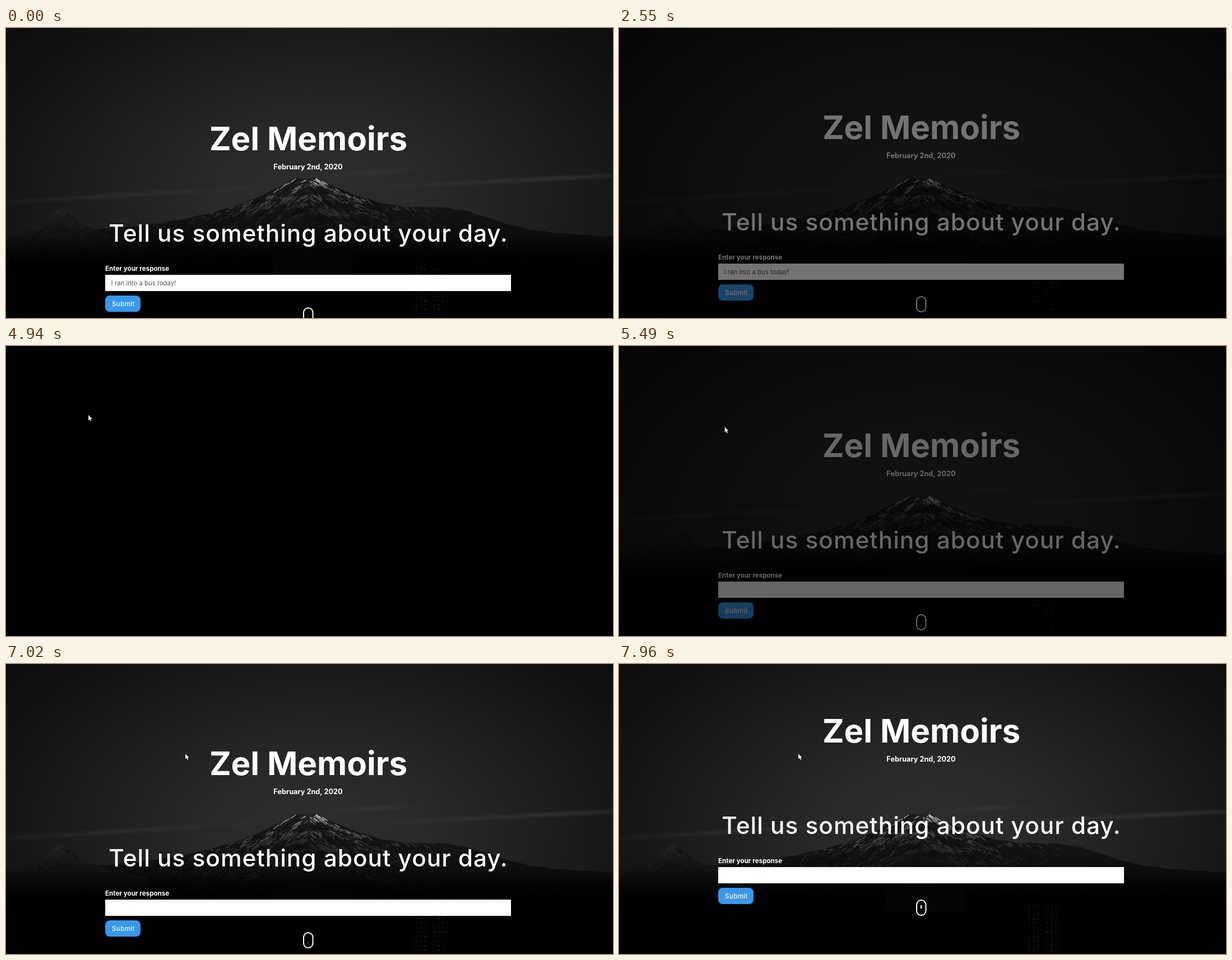
These frames come from a looping animation (1083 px wide and 517 px high, 8 s). An HTML page with a canvas:

```html
<!DOCTYPE html>
<html lang="en">
<head>
<meta charset="utf-8">
<title>Zel Memoirs</title>
<style>
html, body { margin: 0; width: 100%; height: 100%; overflow: hidden; background: #000; }
canvas { display: block; }
</style>
</head>
<body>
<canvas id="stage" width="1083" height="517"></canvas>
<script>
const W = 1083, H = 517, LOOP = 8000;
const ctx = document.getElementById('stage').getContext('2d');

let seed = 7;
const rand = () => (seed = (seed * 16807) % 2147483647) / 2147483647;
const grey = (v, a = 1) => `rgba(${v},${v},${v},${a})`;
const clamp = v => Math.min(1, Math.max(0, v));
const swing = p => 0.5 - Math.cos(clamp(p) * Math.PI) / 2;

// Vertical or radial gradient with evenly spaced greys
function shade(gradient, greys) {
  greys.forEach((v, i) => gradient.addColorStop(i / (greys.length - 1), grey(v)));
  return gradient;
}

// Slope that is flat at the peak and levels out with distance
const cone = (distance, height, width, flat) =>
  height * (1 - Math.exp(-Math.max(0, distance - flat) / width));

function bigRidge(x) {
  const d = x - 535;
  if (d < 0) return 267 + cone(-d, 105, 165, 20);
  return 267 + cone(d, 115, 220, 20) - 22 * Math.exp(-(((d - 270) / 90) ** 2));
}
const smallRidge = x => 321 + cone(Math.abs(x - 97), 62, 60, 4);

// A dark massif with short strokes running down from its peak
function mountain(c, ridge, { peak, from, to, greys, count, spread, depth, glow }) {
  c.save();
  c.beginPath();
  c.moveTo(from, H);
  for (let x = from; x <= to; x += 3) c.lineTo(x, ridge(x) + Math.sin(x / 7) * 0.6);
  c.lineTo(to, H);
  c.fillStyle = shade(c.createLinearGradient(0, ridge(peak), 0, 425), greys);
  c.fill();
  c.clip();
  for (let i = 0; i < count; i++) {
    const x = peak + (rand() + rand() - 1) * spread;
    const d = rand() * depth;
    const near = Math.exp(-Math.abs(x - peak) / (spread * 0.42) - d / (depth * 0.4));
    const facet = Math.sin(x / 11 + d / 4) + Math.sin(x / 27 - d / 7);
    const lit = facet + rand() > 0.3;
    const side = x < peak ? -1 : 1;
    const len = 3 + rand() * 8;
    c.strokeStyle = lit ? grey(Math.round(18 + glow * near), 0.6) : grey(10, 0.5);
    c.lineWidth = 0.6 + rand() * 1.3;
    c.beginPath();
    c.moveTo(x, ridge(x) + d);
    c.lineTo(x + side * len, ridge(x) + d + len * (0.4 + rand() * 0.5));
    c.stroke();
  }
  c.restore();
}

function cloud(c, x, y, length, rise, alpha) {
  c.save();
  c.filter = 'blur(2.5px)';
  c.translate(x, y);
  c.rotate(-rise);
  const g = c.createLinearGradient(0, 0, length, 0);
  [0, alpha, 0].forEach((a, i) => g.addColorStop(i / 2, grey(150, a)));
  c.fillStyle = g;
  c.fillRect(0, -3, length, 6);
  c.restore();
}

function building(c, x, y, cols, rows) {
  for (let i = 0; i < cols; i++) for (let j = 0; j < rows; j++) {
    c.fillStyle = grey(17, 0.3 + rand() * 0.7);
    c.fillRect(x + i * 8, y + j * 8, 4, 4);
  }
}

function paintScene() {
  const scene = document.createElement('canvas');
  scene.width = W;
  scene.height = H;
  const c = scene.getContext('2d');

  c.save();
  c.translate(560, 300);
  c.scale(1, 0.62);
  c.fillStyle = shade(c.createRadialGradient(0, 0, 0, 0, 0, 760), [46, 41, 31, 21, 11]);
  c.fillRect(-560, -500, W, 1000);
  c.restore();

  cloud(c, -120, 318, 620, 0.06, 0.12);
  cloud(c, 640, 285, 690, 0.05, 0.18);
  cloud(c, 560, 262, 200, 0.05, 0.1);

  mountain(c, bigRidge, { peak: 540, from: 0, to: W, greys: [34, 22, 17, 9, 2],
    count: 1300, spread: 270, depth: 78, glow: 235 });
  mountain(c, smallRidge, { peak: 97, from: -3, to: 252, greys: [32, 21, 13, 2],
    count: 200, spread: 110, depth: 45, glow: 40 });

  const ground = c.createLinearGradient(0, 370, 0, 435);
  [0, 0.55, 0.95].forEach((a, i) => ground.addColorStop(i / 2, grey(0, a)));
  c.fillStyle = ground;
  c.fillRect(0, 370, W, H - 370);

  c.fillStyle = grey(5);
  c.fillRect(476, 402, 142, 40);
  c.fillRect(502, 390, 62, 14);
  building(c, 730, 428, 3, 11);
  building(c, 762, 428, 3, 11);
  return scene;
}

const scene = paintScene();

function text(str, x, y, size, weight, { color = '#fff', spacing = 0, align = 'left' } = {}) {
  ctx.font = `${weight} ${size}px Inter, Roboto, sans-serif`;
  ctx.letterSpacing = spacing + 'px';
  ctx.textAlign = align;
  ctx.fillStyle = color;
  ctx.fillText(str, x, y);
}

function box(x, y, w, h, r) {
  ctx.beginPath();
  ctx.roundRect(x, y, w, h, r);
}

function scrollHint(t) {
  ctx.strokeStyle = '#fff';
  ctx.lineWidth = 2;
  box(531, 479, 16.5, 27, 8.25);
  ctx.stroke();
  const start = t < 4000 ? 590 : 5650;
  const phase = (t - start + 4000) % 2000 / 2000;
  const fall = 1 - (1 - clamp((phase - 0.1) / 0.9)) ** 1.7;
  ctx.fillStyle = grey(255, phase < 0.1 ? phase * 10 : 1 - fall);
  box(537.8, 487 + fall * 8, 2.6, 6.5, 1);
  ctx.fill();
}

function page(t) {
  const center = { align: 'center' };
  ctx.save();
  ctx.translate(0, 20 * (1 - swing((t - 550) / 450)) - 58 * clamp((t - 7060) / 900));
  text('Zel Memoirs', 539.5, 198, 58.3, 700, center);
  text('February 2nd, 2020', 539, 232.3, 12.7, 700, center);
  text('Tell us something about your day.', 539.5, 360.5, 42.3, 500, { align: 'center', spacing: 1 });
  text('Enter your response', 177, 412.5, 11.6, 700);
  ctx.fillStyle = '#fff';
  ctx.fillRect(177, 420, 724, 29);
  if (t < 4000) text('I ran into a bus today!', 187.5, 438.5, 11.4, 400, { color: '#555' });
  ctx.fillStyle = '#3898ec';
  box(177, 457, 63, 29, 8);
  ctx.fill();
  text('Submit', 189, 475.5, 11.5, 500, { spacing: 0.4 });
  scrollHint(t);
  ctx.restore();
}

// Pointer stops: time, x, y
const stops = [[1100, 953, 389], [1680, 216, 28], [3230, 216, 28], [3860, 88, 138],
  [4860, 88, 138], [4940, 147, 123], [5720, 206, 153], [6150, 95, 162], [6900, 320, 160]];

function pointerAt(t) {
  const next = stops.findIndex(s => s[0] > t);
  if (next < 1) return stops.at(next).slice(1);
  const [t1, x1, y1] = stops[next - 1], [t2, x2, y2] = stops[next];
  const p = (t - t1) / (t2 - t1);
  return [x1 + (x2 - x1) * p, y1 + (y2 - y1) * p];
}

const arrow = new Path2D('M0 0V9.6L2.2 7.6 3.8 11 5.3 10.3 3.8 7.1 6.7 7Z');

function pointer(t) {
  if (t < 200 || (t >= 1910 && t < 3230)) return;
  ctx.save();
  ctx.translate(...pointerAt(t));
  ctx.strokeStyle = '#000';
  ctx.lineWidth = 1;
  ctx.stroke(arrow);
  ctx.fillStyle = '#fff';
  ctx.fill(arrow);
  ctx.restore();
}

function draw() {
  const t = performance.now() % LOOP;
  const shown = t < 4000 ? 1 - swing((t - 2110) / 830) : swing((t - 5020) / 1080);
  ctx.drawImage(scene, 0, 0);
  page(t);
  ctx.fillStyle = grey(0, 1 - shown);
  ctx.fillRect(0, 0, W, H);
  pointer(t);
  requestAnimationFrame(draw);
}
draw();
</script>
</body>
</html>
```
